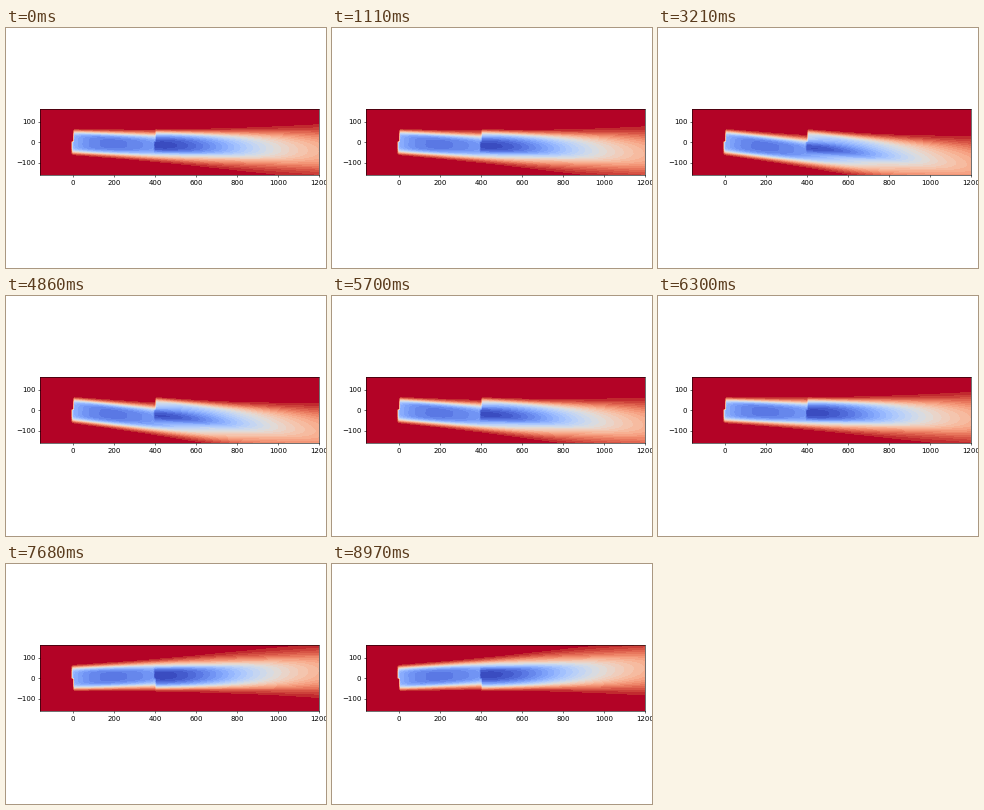
A matplotlib script that plays this animation: 320 by 240 pixels, repeating every 9 s.

```python
import numpy as np
import matplotlib.pyplot as plt
from matplotlib.animation import FuncAnimation

W, H, DPI = 320, 240, 50
FRAMES, INTERVAL = 300, 30
X0, X1, Y = -160, 1200, 160
SPACING = 400
BANDS = 30

xs = np.linspace(X0, X1, 171)
ys = np.linspace(-Y, Y, 81)
gx, gy = np.meshgrid(xs, ys)
dx, dy = xs[1] - xs[0], ys[1] - ys[0]

# wind angle in degrees at a few times in seconds, joined by a smooth curve
times = [0, 1.11, 2.2, 3.21, 4.1, 4.86, 5.7, 6.87, 8.0, 8.7, 8.97]
angles = [2.5, 3.4, 4.9, 6.2, 6.8, 6.2, 4.2, 0.3, -2.5, -2.9, -2.85]
wind = np.poly1d(np.polyfit(times, angles, 5))


def wake(turbine_x, theta, peak, length, power, spread):
    """Speed deficit behind one rotor: flat-topped near it, Gaussian far away."""
    px = gx - turbine_x
    along = px * np.cos(theta) - gy * np.sin(theta)
    across = np.abs(px * np.sin(theta) + gy * np.cos(theta))
    s = np.maximum(along, 0)
    centre = peak * (1 - 0.22 * np.exp(-s / 90)) / (1 + (s / length) ** power)
    width = 53 + 44 * (s / spread) ** 2
    sharp = 2 + 4 * np.exp(-s / 500)
    return np.where(along >= -1e-9, centre * np.exp(-(across / width) ** sharp), 0)


def speed(t):
    theta = np.radians(wind(t))
    first = wake(0, theta, 0.92, 780, 2.8, 1200)
    second = wake(SPACING, theta, 0.72, 620, 2.3, 850)
    return 1 - np.hypot(first, second)


fig = plt.figure(figsize=(W / DPI, H / DPI), dpi=DPI, facecolor="white")
left, right, top, bottom = 34.2, 313.0, 81.4, 147.0
ax = fig.add_axes([left / W, 1 - bottom / H, (right - left) / W, (bottom - top) / H])
field = ax.imshow(
    speed(0), origin="lower", aspect="auto", interpolation="bilinear",
    extent=(X0 - dx / 2, X1 + dx / 2, -Y - dy / 2, Y + dy / 2),
    cmap=plt.get_cmap("coolwarm", BANDS), vmin=0, vmax=1)
ax.set_xlim(X0, X1)
ax.set_ylim(-Y, Y)
ax.set_xticks(range(0, 1201, 200))
ax.set_yticks([-100, 0, 100])


def update(i):
    field.set_data(speed(i * INTERVAL / 1000))
    return [field]


anim = FuncAnimation(fig, update, frames=FRAMES, interval=INTERVAL,
                     repeat=True, repeat_delay=0, blit=False)
plt.show()
```
